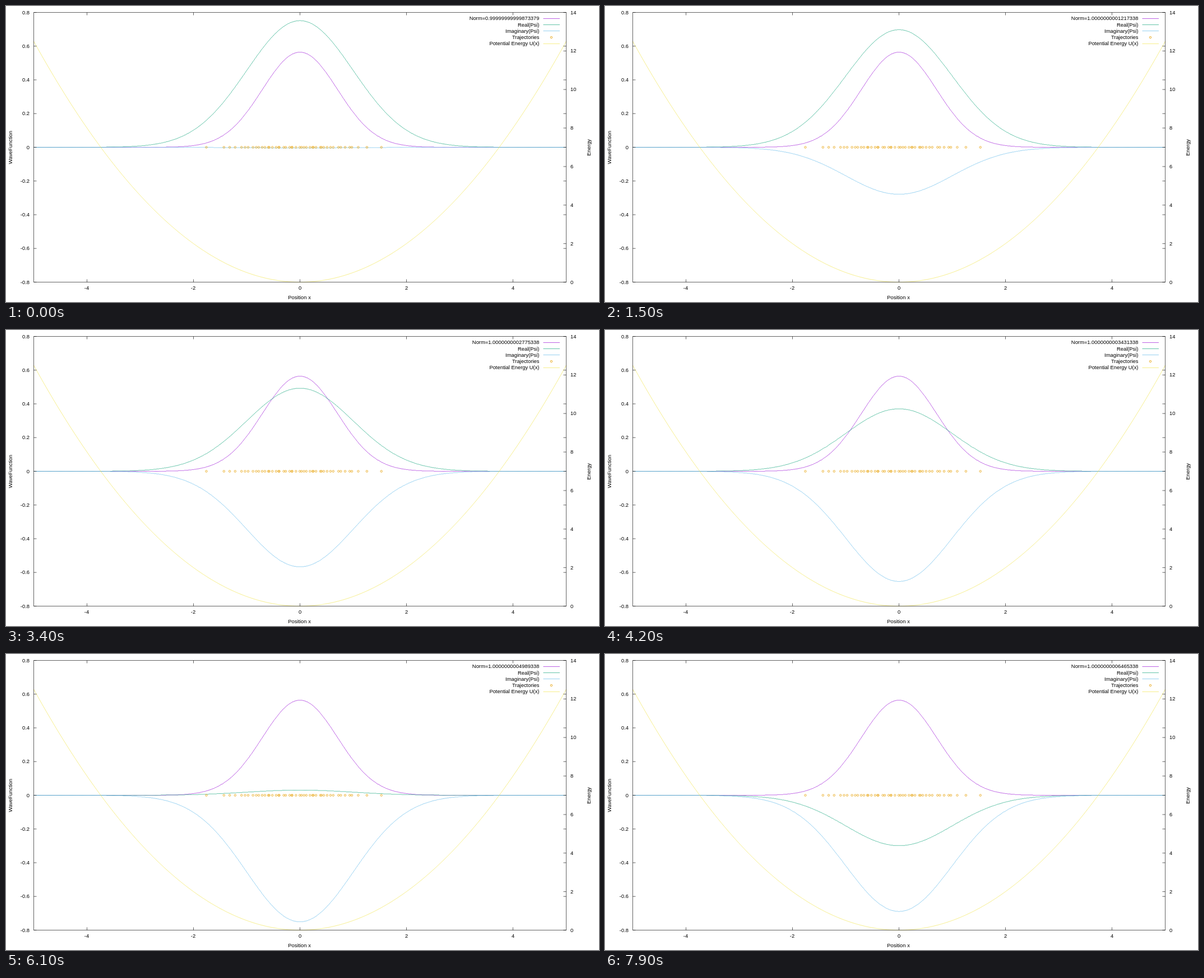
Animation, 1058 px wide and 529 px high, one loop 8000 ms. Source, as an HTML page:

```html
<!DOCTYPE html>
<html lang="en">
<head>
<meta charset="utf-8">
<title>Harmonic oscillator ground state</title>
<style>
  html, body { margin: 0; width: 100%; height: 100%; overflow: hidden; background: #fff; }
  svg { display: block; width: 100%; height: 100%; }
  text { font: 9.4px "Liberation Sans", Arial, sans-serif; fill: #000; }
  path { fill: none; stroke-width: 0.62; }
  circle { fill: none; stroke: #e69f00; stroke-width: 0.8; }
</style>
</head>
<body>
<svg id="stage" viewBox="0 0 1058 529"></svg>
<script>
const STEP = 100, STEPS = 80;
const LEFT = 49.5, RIGHT = 999.5, TOP = 11.5, BOTTOM = 493.5;
const COLORS = { norm: '#9400d3', real: '#009e73', imag: '#56b4e9', potential: '#f0e442' };
const stage = document.getElementById('stage');

const px = x => 524.5 + 95 * x;
const py = v => 252.5 - 301.25 * v;
const energyY = e => BOTTOM - e * (BOTTOM - TOP) / 14;

function add(tag, attrs, content = '') {
  const node = document.createElementNS('http://www.w3.org/2000/svg', tag);
  for (const name in attrs) node.setAttribute(name, attrs[name]);
  node.textContent = content;
  return stage.appendChild(node);
}
const line = (stroke, d = '') => add('path', { stroke, d });
const label = (content, x, y, anchor) => add('text', { x, y, 'text-anchor': anchor }, content);
const dot = (cx, cy) => add('circle', { cx, cy, r: 1.7 });

function curve(toY) {
  let d = '';
  for (let i = 0; i <= 1000; i++) {
    const x = -5 + i / 100;
    d += (i ? 'L' : 'M') + px(x).toFixed(2) + ' ' + toY(x).toFixed(2);
  }
  return d;
}
// Values settle on a fine vertical grid, so flat tails merge with the zero line.
const snap = v => Math.round(v / 0.002) * 0.002;
const wave = f => curve(x => py(snap(f(x))));

const psi = x => Math.PI ** -0.25 * Math.exp(-x * x / 2);

line(COLORS.norm, wave(x => psi(x) ** 2));
const real = line(COLORS.real);
const imag = line(COLORS.imag);

// Particles follow the quantiles of a bell-shaped distribution, slightly scattered.
const PARTICLES = 46;
let seed = 7;
const random = () => (seed = seed * 16807 % 2147483647) / 2147483647;
for (let i = 0; i < PARTICLES; i++) {
  const u = (i + 0.5) / PARTICLES;
  const x = -0.1 + 0.22 * Math.log(u / (1 - u)) + 1.3 * (u - 0.5);
  dot(px(x + 0.06 * (random() - 0.5)), 252.5);
}
line(COLORS.potential, curve(x => energyY(x * x / 2)));

// Frame, ticks and tick labels
let ticks = `M${LEFT} ${TOP}H${RIGHT}V${BOTTOM}H${LEFT}Z`;
for (let x = -4; x <= 4; x += 2) {
  ticks += `M${px(x)} ${TOP}v5M${px(x)} ${BOTTOM}v-5`;
  label(x, px(x) - (x < 0 ? 0.5 : 0), 507.3, 'middle');
}
for (let i = -4; i <= 4; i++) {
  const y = py(i / 5);
  ticks += `M${LEFT} ${y}h5M${RIGHT} ${y}h-5`;
  label(i / 5, 42, y + 3, 'end');
}
for (let e = 0; e <= 14; e += 2) {
  const y = energyY(e);
  ticks += `M${RIGHT} ${y}h-5`;
  label(e, 1007, y + 3, 'start');
}
line('#000', ticks);

label('Position x', 523.5, 523.8, 'middle');
const vertical = (content, x) =>
  label(content, 0, 0, 'middle').setAttribute('transform', `translate(${x} 252.8) rotate(-90)`);
vertical('WaveFunction', 11);
vertical('Energy', 1042.5);

// Legend
const legend = [
  ['', COLORS.norm], ['Real(Psi)', COLORS.real], ['Imaginary(Psi)', COLORS.imag],
  ['Trajectories'], ['Potential Energy U(x)', COLORS.potential]
].map(([name, color], i) => {
  const y = 22.4 + 11.2 * i;
  if (color) line(color, `M958.5 ${Math.floor(y) + 0.5}H988`);
  else dot(973, y + 0.1);
  return label(name, 951.5, y + 3, 'end');
});

// The norm starts just below one and drifts up steadily (units of 1e-16).
function normText(step) {
  if (step === 0) return 'Norm=0.99999999999873379';
  return 'Norm=1.' + String(82000 * step - 12662).padStart(16, '0');
}

let shown = -1;
function draw(now) {
  const step = Math.floor(now / STEP) % STEPS;
  if (step !== shown) {
    shown = step;
    const phase = 0.005 + 0.025 * step;
    real.setAttribute('d', wave(x => psi(x) * Math.cos(phase)));
    imag.setAttribute('d', wave(x => -psi(x) * Math.sin(phase)));
    legend[0].textContent = normText(step);
  }
  requestAnimationFrame(draw);
}
draw(performance.now());
</script>
</body>
</html>
```
